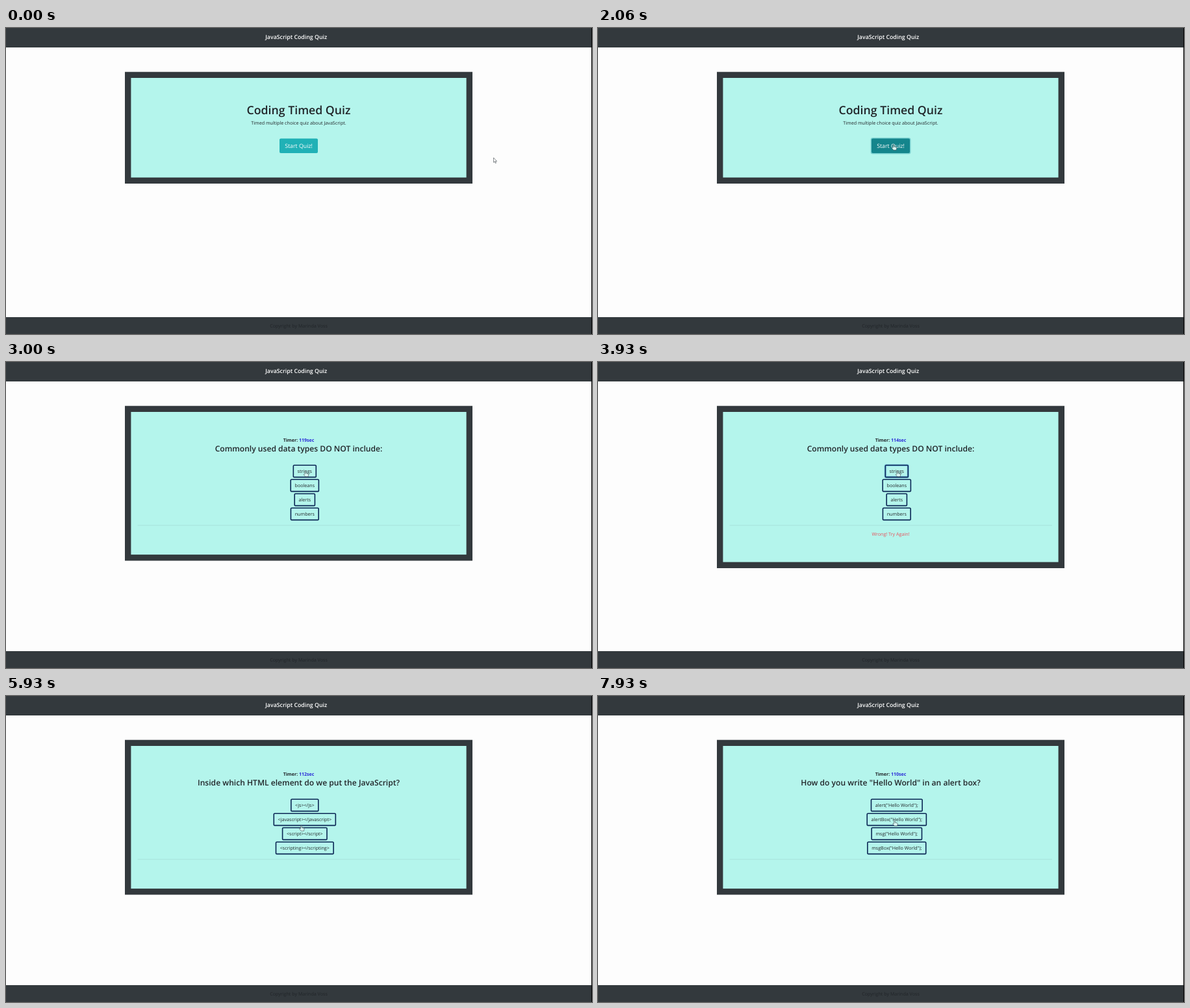
Recreate the animation shown at these times as an HTML page. Size 902x472 px, loop 8 s.

```html
<!DOCTYPE html>
<html lang="en">
<head>
<meta charset="utf-8">
<title>JavaScript Coding Quiz</title>
<style>
html, body { margin: 0; width: 100%; height: 100%; overflow: hidden; background: #fdfdfd; }
svg { display: block; width: 902px; height: 472px; }
text { font-family: "Open Sans", "Noto Sans", sans-serif; font-size: 7.15px; fill: #212529;
  text-anchor: middle; text-rendering: geometricPrecision; }
.title { font-size: 8.8px; font-weight: 600; fill: #fff; }
.h1 { font-size: 17.7px; font-weight: 600; }
.start { font-size: 8.8px; fill: #fff; }
.timer { font-size: 7.05px; font-weight: 700; }
.timer tspan { fill: #2a2ad8; }
.question { font-size: 12.1px; font-weight: 600; }
.option { fill: none; stroke: #0a2654; stroke-width: 1.6; }
.glow { fill: none; stroke: #3a8fd8; stroke-opacity: .4; stroke-width: 3.6; }
.good { fill: #5fe8a0; }
.bad { fill: #e8505b; }
.pointer { fill: #fff; stroke: #3c4448; stroke-width: .6; stroke-linejoin: round; }
#hand { fill: #d9faf6; }
</style>
</head>
<body>
<svg viewBox="0 0 902 472">
  <rect width="902" height="472" fill="#fdfdfd"/>
  <path d="M0 0H902V30H0ZM0 446H902V472H0Z" fill="#33393d"/>
  <text class="title" x="446.7" y="17">JavaScript Coding Quiz</text>
  <text x="450.5" y="462">Copyright by Marinda Voss</text>
  <g id="scene"></g>
  <path id="arrow" class="pointer" d="M0 0V7.4L1.7 5.9 2.9 8.6 4 8.1 2.8 5.5H5Z"/>
  <path id="hand" class="pointer" d="M-.8 4.6V.6Q0-.4.8.6V3.2L4 3.9Q5 4.2 4.8 5.2L4.1 8.3H-.2L-2.8 5.2Q-2.6 4.1-1.7 4.4Z"/>
  <path d="M901.5 0V472" stroke="#000"/>
</svg>
<script>
const LOOP = 8000, STEP = 1000 / 15;
const $ = id => document.getElementById(id);
const scene = $("scene"), arrow = $("arrow"), hand = $("hand");

const questions = [
  { from: 2130, click: 3660, pick: 0, text: "Commonly used data types DO NOT include:",
    options: ["strings", "booleans", "alerts", "numbers"],
    mood: "bad", reply: "Wrong! Try Again!" },
  { from: 4800, click: 6260, pick: 2, text: "Inside which HTML element do we put the JavaScript?",
    options: ["js", "javascript", "script", "scripting"].map(tag => `<${tag}></${tag}>`),
    mood: "good", reply: "Correct! Good Job!" },
  { from: 7330, click: Infinity, text: 'How do you write "Hello World" in an alert box?',
    options: ["alert", "alertBox", "msg", "msgBox"].map(name => `${name}("Hello World");`) }
];

// Pointer path: time, x, y
const path = [
  [0, 750.5, 200], [200, 712, 245], [400, 628, 287], [600, 520, 262], [730, 458, 205],
  [860, 432, 172], [930, 431, 168], [1060, 437, 167], [1200, 437, 167], [1400, 446, 174],
  [1660, 455, 180], [2660, 455, 180], [2800, 458, 205], [2870, 459, 217], [3000, 461, 168.5],
  [5660, 461, 168.5], [5860, 456, 194], [6060, 451.5, 210], [7730, 451.5, 210], [7930, 456.5, 192]
];

const esc = s => s.replace(/&/g, "&amp;").replace(/</g, "&lt;");
const label = (cls, x, y, s) => `<text class="${cls}" x="${x}" y="${y}">${esc(s)}</text>`;
const card = bottom =>
  `<rect x="183" y="67.7" width="535" height="${bottom - 67.7}" fill="#33393d"/>
   <rect x="192.4" y="77" width="516.2" height="${bottom - 86.4}" fill="#b4f5ec"/>`;

function pointerAt(t) {
  const i = path.findIndex(p => p[0] > t);
  if (i < 0) return path[path.length - 1].slice(1);
  const [a, b] = [path[i - 1], path[i]], k = (t - a[0]) / (b[0] - a[0]);
  return [a[1] + (b[1] - a[1]) * k, a[2] + (b[2] - a[2]) * k];
}

// One tick per second after the start, five more for a wrong answer
const secondsLeft = t => 120 - Math.max(0, Math.floor(t / 1000) - 2) - (t >= 3660 ? 5 : 0);

function startScreen(hover, focus) {
  return card(240) +
    label("h1", 450.5, 133, "Coding Timed Quiz") +
    label("", 450.5, 149, "Timed multiple choice quiz about JavaScript.") +
    (focus ? '<rect x="419.6" y="169.2" width="61.8" height="25.2" rx="3" fill="#78cfd0"/>' : "") +
    `<rect x="421" y="170.6" width="59" height="22.4" rx="2" fill="${focus ? "#14858c" : hover ? "#17979e" : "#20b1b6"}"/>` +
    label("start", 450.5, 185.4, "Start Quiz!");
}

function quizScreen(q, seconds, answered) {
  return card(answered ? 318 : 306.5) +
    `<text class="timer" x="450.5" y="122.8">Timer: <tspan>${seconds}sec</tspan></text>` +
    label("question", 450.5, 138.4, q.text) +
    q.options.map((s, i) =>
      (answered && i === q.pick ? `<rect class="glow" data-row="${i}"/>` : "") +
      `<rect class="option" data-row="${i}"/>` + label("row", 459.8, 171 + 22 * i, s)).join("") +
    '<path d="M202.5 252H699" stroke="#000" stroke-opacity=".1" stroke-width=".8"/>' +
    (answered ? label(q.mood, 450.5, 268, q.reply) : "");
}

function fitBoxes() {
  const rows = scene.querySelectorAll(".row");
  for (const box of scene.querySelectorAll("[data-row]")) {
    const i = +box.dataset.row, width = rows[i].getComputedTextLength() + 12.6;
    const at = { x: 459.8 - width / 2, y: 159.2 + 22 * i, width, height: 18.4, rx: 1.2 };
    for (const key in at) box.setAttribute(key, at[key]);
  }
}

let shown = "";
function draw(now) {
  const t = Math.floor((now % LOOP + 7) / STEP) * STEP;
  const q = questions.filter(item => t >= item.from).pop();
  const [x, y] = pointerAt(t);
  const hover = x > 421 && x < 480 && y > 170.6 && y < 193;
  const html = q ? quizScreen(q, secondsLeft(t), t >= q.click) : startScreen(hover, t >= 1920);
  if (html !== shown) {
    scene.innerHTML = shown = html;
    fitBoxes();
  }
  const pointing = q || hover;
  arrow.style.display = pointing ? "none" : "";
  hand.style.display = pointing ? "" : "none";
  (pointing ? hand : arrow).setAttribute("transform", `translate(${x} ${y})`);
  requestAnimationFrame(draw);
}
requestAnimationFrame(draw);
</script>
</body>
</html>
```
